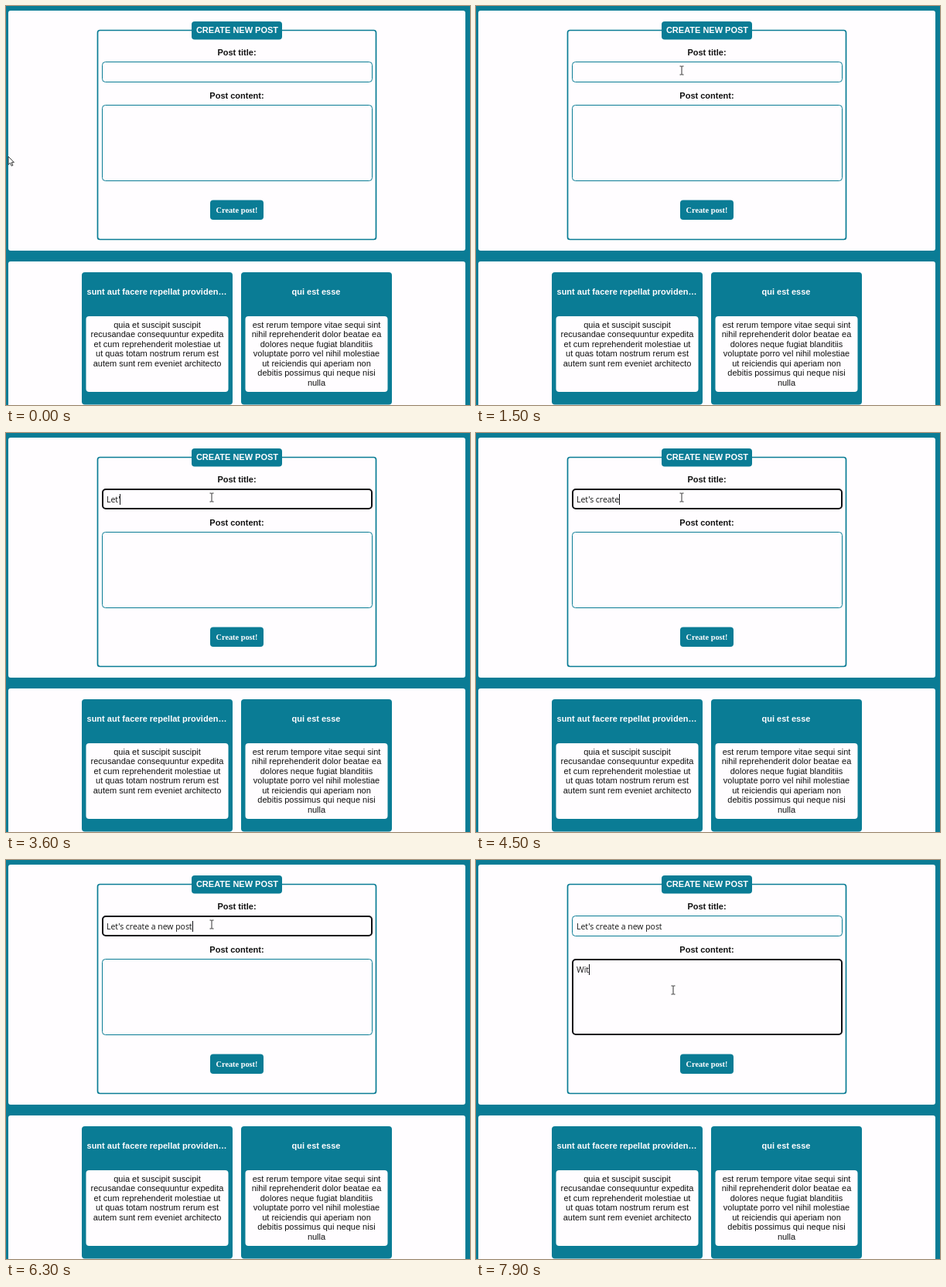
An HTML page for the animation above (8000 ms loop, 600 by 517 pixels).

```html
<!DOCTYPE html>
<html lang="en">
<head>
<meta charset="utf-8">
<title>Create new post</title>
<style>
  html, body { margin: 0; width: 100%; height: 100%; overflow: hidden; background: #0a7c95; }
  svg { display: block; width: 600px; height: 517px; }
  text { font: 11px "Liberation Sans", Arial, sans-serif; text-anchor: middle; fill: #111; }
  .bold { font-weight: bold; }
  .light { fill: #fffdff; }
  .button { font: bold 10.3px "Liberation Serif", "Times New Roman", serif; }
  .typed { font: 10.45px "Open Sans", "Noto Sans", sans-serif; text-anchor: start; white-space: pre; }
  .teal { fill: #0a7c95; }
  .paper { fill: #fffdff; }
</style>
</head>
<body>
<svg id="stage" viewBox="0 0 600 517" xmlns="http://www.w3.org/2000/svg"></svg>
<script>
const stage = document.getElementById('stage');
const LOOP = 8000, STEP = 100;
const TEAL = '#0a7c95', INK = '#101014';

function add(tag, attrs, content = '') {
  const el = document.createElementNS('http://www.w3.org/2000/svg', tag);
  for (const key in attrs) el.setAttribute(key, attrs[key]);
  el.textContent = content;
  stage.appendChild(el);
  return el;
}
const box = (x, y, width, height, cls, rx = 4) =>
  add('rect', { x, y, width, height, rx, class: cls });
const label = (x, y, content, cls = '') => add('text', { x, y, class: cls }, content);

function card(x, title, lines) {
  box(x, 345, 195, 171.5, 'teal');
  box(x + 5.5, 402, 184, 98, 'paper');
  label(x + 97, 374, title, 'bold light');
  lines.forEach((line, i) => label(x + 97.5, 417 + i * 12.45, line));
}

function field(y, height, baseline) {
  return {
    y, height, baseline,
    frame: add('rect', { class: 'paper' }),
    text: add('text', { x: 130, y: baseline, class: 'typed' })
  };
}

function drawFrame(f, focused) {
  const w = focused ? 2 : 1;
  const attrs = {
    x: 124 + w / 2, y: f.y + w / 2, width: 350 - w, height: f.height - w,
    rx: 4, stroke: focused ? INK : TEAL, 'stroke-width': w
  };
  for (const key in attrs) f.frame.setAttribute(key, attrs[key]);
}

box(0, 0, 600, 517, 'teal', 0);
box(3, 6, 591, 311, 'paper', 3);
box(3, 331, 591, 200, 'paper', 3);

add('rect', { x: 118.5, y: 31.5, width: 360, height: 271, rx: 3, fill: 'none', stroke: TEAL, 'stroke-width': 1.7 });
box(240, 20, 117, 23.5, 'teal');
label(299, 35, 'CREATE NEW POST', 'bold light');
label(298.5, 64, 'Post title:', 'bold');
label(298.5, 119.5, 'Post content:', 'bold');
box(264, 251.5, 69, 25.5, 'teal');
label(298.5, 267.5, 'Create post!', 'button light');

card(98, 'sunt aut facere repellat providen…', [
  'quia et suscipit suscipit', 'recusandae consequuntur expedita',
  'et cum reprehenderit molestiae ut', 'ut quas totam nostrum rerum est',
  'autem sunt rem eveniet architecto'
]);
card(304, 'qui est esse', [
  'est rerum tempore vitae sequi sint', 'nihil reprehenderit dolor beatae ea',
  'dolores neque fugiat blanditiis', 'voluptate porro vel nihil molestiae',
  'ut reiciendis qui aperiam non', 'debitis possimus qui neque nisi', 'nulla'
]);

const title = field(72, 27, 90);
const content = field(128, 99, 146);
const caret = add('rect', { width: 1, height: 14, fill: INK });
const arrow = add('path', {
  d: 'M0 0V10.5L2.5 8.3L4.2 12.2L5.9 11.4L4.2 7.7H7.4Z',
  fill: '#fff', stroke: '#222', 'stroke-width': 0.9
});
const beam = add('path', {
  d: 'M-2.5 -5.5H-.8L0 -5L.8 -5.5H2.5M0 -5V5M-2.5 5.5H-.8L0 5L.8 5.5H2.5',
  fill: 'none', stroke: '#333', 'stroke-width': 1
});

// Keyframes are [time, value]; values are interpolated linearly.
const titleKeys = [[3100, 0], [3500, 4], [4450, 12], [6000, 23]];
const contentKeys = [[7300, 0], [7850, 3]];
const clicks = { title: 1700, content: 7100 };
const typing = [[3200, 6000], [7500, LOOP]];

function sample(keys, t) {
  if (t <= keys[0][0]) return keys[0][1];
  for (let i = 1; i < keys.length; i++) {
    const [t0, v0] = keys[i - 1], [t1, v1] = keys[i];
    if (t < t1) return v0 + (v1 - v0) * (t - t0) / (t1 - t0);
  }
  return keys[keys.length - 1][1];
}

function ease(t, from, to) {
  const u = Math.min(1, Math.max(0, (t - from) / (to - from)));
  return u * u * (3 - 2 * u);
}

function pointer(t) {
  const first = ease(t, 750, 1500), second = ease(t, 6550, 7000);
  return [3 + 263 * first - 11 * second, 195 - 111.5 * first + 85 * second];
}

function caretVisible(t) {
  if (t < clicks.title) return false;
  if (typing.some(([from, to]) => t >= from && t < to)) return true;
  const since = [clicks.content, 6000, clicks.title].find(start => t >= start);
  return Math.floor((t - since) / 500) % 2 === 0;
}

function show(el, visible) {
  el.setAttribute('visibility', visible ? 'visible' : 'hidden');
}

function render(t) {
  title.text.textContent = "Let's create a new post".slice(0, Math.floor(sample(titleKeys, t)));
  content.text.textContent = 'Wit'.slice(0, Math.floor(sample(contentKeys, t)));

  const active = t >= clicks.content ? content : t >= clicks.title ? title : null;
  drawFrame(title, active === title);
  drawFrame(content, active === content);

  show(caret, caretVisible(t));
  if (active) {
    const width = active.text.textContent ? active.text.getComputedTextLength() : 0;
    caret.setAttribute('x', Math.round(130 + width));
    caret.setAttribute('y', active.baseline - 11);
  }

  const [x, y] = pointer(t);
  const overField = [title, content].some(f =>
    x > 124 && x < 474 && y > f.y && y < f.y + f.height);
  show(beam, overField);
  show(arrow, !overField);
  for (const el of [beam, arrow]) el.setAttribute('transform', `translate(${x} ${y})`);
}

const start = performance.now();
function tick() {
  const t = (performance.now() - start) % LOOP;
  render(Math.floor(t / STEP) * STEP);
  requestAnimationFrame(tick);
}
tick();
</script>
</body>
</html>
```
